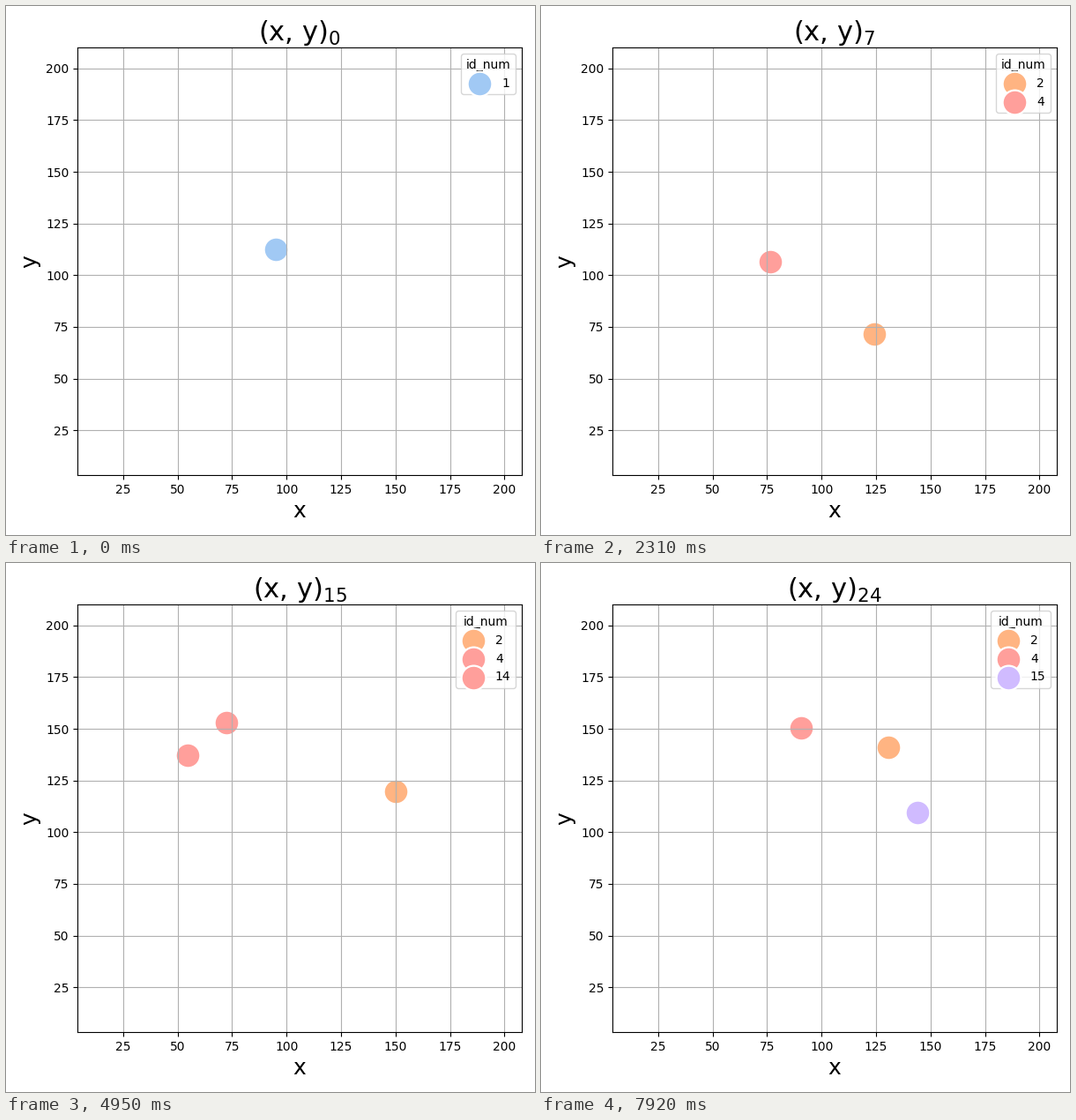
Animation of 600x600 px, one loop 8 s. Source, as a matplotlib script:

```python
import matplotlib.pyplot as plt
import numpy as np
from matplotlib.animation import FuncAnimation
from matplotlib.legend import Legend

SIZE, DPI = 600, 100
LOOP_MS, STEP_MS, TICK_MS = 8000, 330, 40
STEPS = -(-LOOP_MS // STEP_MS)
LEFT, RIGHT, BOTTOM, TOP = 81.1, 585, 68, 553  # axes box in pixels

PASTEL = ["#a1c9f4", "#ffb482", "#8de5a1", "#ff9f9b", "#d0bbff"]

# Turning points of each track: (step, x, y), straight runs between them
TRACKS = {
    1: [(0, 95.1, 112.6), (2, 99.7, 116.1)],
    2: [(2, 121.6, 90.6), (4, 123.2, 85.7), (7, 124.4, 71.4),
        (10, 125.4, 89.6), (12, 141, 104.2), (15, 149.9, 119.7),
        (18, 152.9, 131.2), (21, 135.5, 152.1), (24, 130.7, 140.9)],
    3: [(2, 33.8, 197.1), (4, 28.5, 203.1), (5, 9.3, 204.8)],
    4: [(4, 86, 100.7), (8, 73, 108.5), (10, 51.3, 113), (15, 72.6, 152.8),
        (18, 88.8, 157), (21, 95.7, 147), (24, 90.8, 150.3)],
    14: [(15, 54.7, 137.3), (18, 62, 128.1), (21, 70.6, 131.5),
         (23, 74.2, 134)],
    15: [(16, 158.8, 100.4), (18, 153.3, 97.1), (20, 158.4, 100.4),
         (21, 147.4, 93.4), (24, 143.9, 109.4)],
}
LOST = {(2, 5), (4, 13)}  # (track, step) without a detection


def position(track, step):
    """Place of a track at a step, or None while it is not detected."""
    t, x, y = zip(*TRACKS[track])
    if not t[0] <= step <= t[-1] or (track, step) in LOST:
        return None
    return np.interp(step, t, x), np.interp(step, t, y)


fig = plt.figure(figsize=(SIZE / DPI, SIZE / DPI), dpi=DPI, facecolor="white")
ax = fig.add_axes([LEFT / SIZE, BOTTOM / SIZE,
                   (RIGHT - LEFT) / SIZE, (TOP - BOTTOM) / SIZE])
ax.set(xlim=(4.06, 207.96), ylim=(3.4, 210.1),
       xticks=range(25, 201, 25), yticks=range(25, 201, 25))
ax.set_xlabel("x", fontsize=18)
ax.set_ylabel("y", fontsize=18)
ax.grid(True)
title = ax.set_title("", fontsize=22)


def build(step):
    """Dots and legend for one step."""
    dots = []
    for track in TRACKS:
        pos = position(track, step)
        if pos:
            color = PASTEL[(track - 1) % 10]
            dots.append(ax.scatter(*pos, s=400, color=color, edgecolor="white",
                                   linewidth=1.6, label=str(track)))
    legend = Legend(ax, dots, [d.get_label() for d in dots],
                    loc="upper right", title="id_num")
    ax.add_artist(legend)
    return dots + [legend]


groups = [build(step) for step in range(STEPS)]


def update(i):
    step = ((i + 1) * TICK_MS - 1) // STEP_MS
    title.set_text(f"(x, y)$_{{{step}}}$")
    for k, group in enumerate(groups):
        for artist in group:
            artist.set_visible(k == step)
    return [title, *groups[step]]


anim = FuncAnimation(fig, update, frames=LOOP_MS // TICK_MS,
                     init_func=lambda: update(0), interval=TICK_MS,
                     repeat=True, repeat_delay=0)
plt.show()
```
